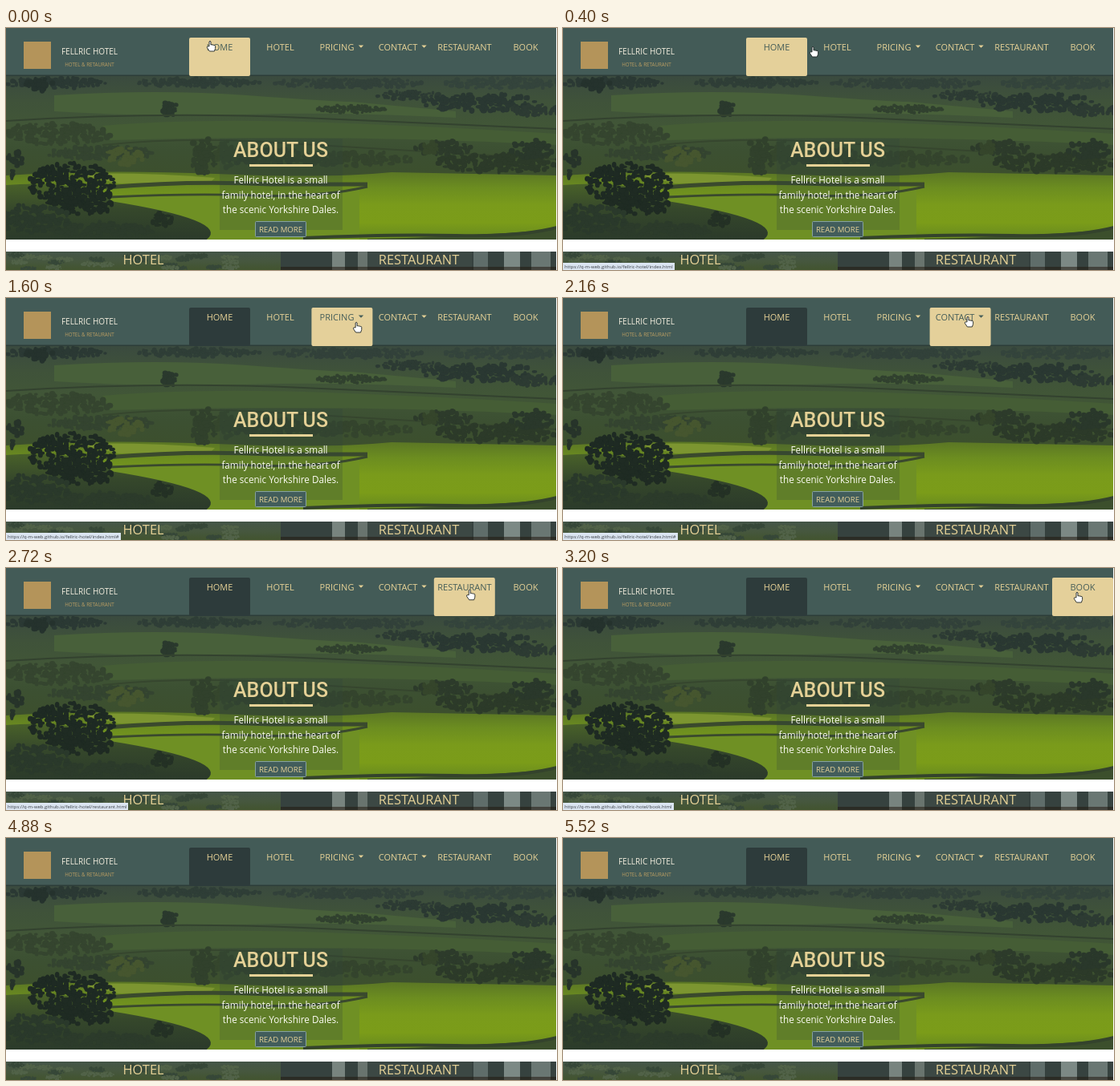
Animation, 686 px wide and 302 px high, one loop 5600 ms. Source, as an HTML page with a canvas:

```html
<!DOCTYPE html>
<html lang="en">
<head>
<meta charset="utf-8">
<title>Fellric Hotel</title>
<style>
html, body { margin: 0; width: 100%; height: 100%; overflow: hidden; background: #fff; }
canvas, svg { position: absolute; left: 0; top: 0; display: block; }
text { font-family: "Open Sans", "Noto Sans", sans-serif; text-anchor: middle; fill: #e5d196; }
.nav text { font-size: 11px; }
.tab { fill: none; }
.tab.current { fill: #2d3b3b; }
.on .tab { fill: #e4d09a; }
.nav .on text, .on .caret { fill: #465e59; }
.caret { fill: #e5d196; }
.title { font: 500 25px Roboto, sans-serif; }
.copy text { font-size: 11.7px; fill: #fbfbf3; }
.panel { font-size: 16.4px; font-weight: 500; }
#status {
  position: absolute; left: 0; top: 293px; height: 9px; padding: 0 2px;
  background: #dbe5f1; color: #3b4048; white-space: nowrap;
  font: 5.9px/10px "Open Sans", "Noto Sans", sans-serif;
}
</style>
</head>
<body>
<canvas id="photo" width="686" height="302"></canvas>
<svg width="686" height="302" viewBox="0 0 686 302">
  <rect width="686" height="59" fill="#435b57"/>
  <rect y="58.5" width="686" height="1.5" fill="#2d3d39"/>

  <rect x="22" y="17" width="34" height="34" fill="#b4945a"/>
  <text x="104" y="33" font-size="10" style="fill:#f1ecdc">FELLRIC HOTEL</text>
  <text x="104" y="47.5" font-size="6.2" style="fill:#b89c62">HOTEL &amp; RETAURANT</text>

  <g class="nav" id="nav"></g>

  <rect x="266" y="138" width="153" height="114" fill="#2f443a" opacity=".24"/>
  <text class="title" x="342" y="161">ABOUT US</text>
  <rect x="303" y="170" width="79" height="3" fill="#e5d196"/>
  <g class="copy">
    <text x="342" y="194">Fellric Hotel is a small</text>
    <text x="342" y="212.5">family hotel, in the heart of</text>
    <text x="342" y="231">the scenic Yorkshire Dales.</text>
  </g>
  <rect x="310.5" y="241.5" width="63" height="19" rx="1" fill="#425d5b" stroke="#86a3a0"/>
  <text x="342" y="255" font-size="9.6">READ MORE</text>

  <text class="panel" x="171" y="295">HOTEL</text>
  <text class="panel" x="514" y="295">RESTAURANT</text>
  <rect x="685" width="1" height="302" fill="#fff"/>

  <path id="hand" fill="#fff" stroke="#1d2424" stroke-width=".9" stroke-linejoin="round"
    d="M-1 7V1Q0-.6 1 1V5Q2 4 3 5.2Q4 4.4 5 5.6Q6.4 5 6.6 6.6V9.5L5.4 13H-.6L-3.6 8.6Q-4 6.6-2.4 6.8Z"/>
</svg>
<div id="status"></div>

<script>
const $ = id => document.getElementById(id);

// Background pictures
const ctx = $("photo").getContext("2d");
let seed = 7;
const rnd = () => (seed = seed * 16807 % 2147483647) / 2147483647;

function ramp(y0, y1, ...colors) {
  const g = ctx.createLinearGradient(0, y0, 0, y1);
  colors.forEach((c, i) => g.addColorStop(i / (colors.length - 1), c));
  return g;
}
function box(x, y, w, h, fill) {
  ctx.fillStyle = fill;
  ctx.fillRect(x, y, w, h);
}
function field(fill, d) {
  ctx.fillStyle = fill;
  ctx.fill(new Path2D(d));
}
function wall(color, width, d) {
  ctx.strokeStyle = color;
  ctx.lineWidth = width;
  ctx.stroke(new Path2D(d));
}
// Leafy clump: many small blobs inside an ellipse, denser in the middle
function trees(x, y, w, h, color) {
  ctx.fillStyle = color;
  const r = Math.min(4, h / 6);
  const n = w * h / (r * r) * .55;
  for (let i = 0; i < n; i++) {
    const a = rnd() * 2 * Math.PI, k = rnd() ** .6;
    ctx.beginPath();
    ctx.ellipse(x + Math.cos(a) * k * (w / 2 - r), y + Math.sin(a) * k * (h / 2 - r),
      r * (.5 + rnd() * .6), r * (.4 + rnd() * .6), 0, 0, 7);
    ctx.fill();
  }
}

function paintValley() {
  ctx.save();
  ctx.beginPath();
  ctx.rect(0, 59, 686, 205);
  ctx.clip();
  box(0, 59, 686, 205, ramp(59, 184, "#3a4a3f", "#3f523a", "#415637", "#3c5032", "#3c4f2d"));
  field("#48603a", "M60 84Q190 76 300 84T430 92L560 104V112Q400 104 300 108T60 104Z");
  field("#455d35", "M120 122Q240 112 400 118T686 132V146Q420 132 130 140Z");
  trees(60, 69, 140, 20, "#2b3934");
  trees(240, 68, 160, 17, "#2f3e37");
  trees(430, 69, 200, 18, "#32413a");
  trees(620, 69, 160, 20, "#34443c");
  trees(500, 84, 90, 16, "#2d3b34");
  trees(590, 93, 150, 30, "#2a3832");
  trees(660, 102, 70, 22, "#2d3b33");
  trees(430, 101, 90, 15, "#31412f");
  trees(43, 71, 44, 24, "#25322d");
  trees(203, 101, 28, 28, "#2a392d");
  trees(60, 132, 150, 34, "#35452f");
  wall("#33422f", 2, "M0 116Q190 104 370 112T686 126");
  wall("#36462e", 2, "M120 146Q220 136 320 142T686 164");

  field(ramp(178, 264, "#597425", "#6c8d20", "#7a9b1b", "#7b9c19", "#668820"),
    "M0 184Q120 176 260 182T480 180L686 184V264H0Z");
  field(ramp(190, 264, "#4c6529", "#35472b", "#2b3a2a"),
    "M0 196Q70 190 130 208T290 228L250 264H0Z");
  field("#6f9024", "M130 208Q220 206 330 211L440 200V264H250Q280 240 130 216Z");
  field("#7c9530", "M90 182Q170 180 260 187L255 192L140 194Z");
  field("#3c4f2c", "M450 263Q570 261 686 251V264H450Z");
  wall("#3a492d", 5, "M125 199Q230 190 330 195L450 195");
  wall("#3a492d", 3, "M130 211Q230 206 310 209T450 198");
  wall("#34432c", 4, "M370 262Q480 257 560 259T686 249");

  trees(120, 156, 150, 24, "#344430");
  trees(320, 160, 130, 28, "#33432e");
  trees(430, 163, 160, 26, "#34442d");
  trees(545, 150, 80, 26, "#2d3b2b");
  trees(615, 168, 170, 32, "#2c3a29");
  trees(528, 149, 26, 24, "#35452b");
  trees(655, 151, 60, 32, "#2a382b");
  trees(245, 159, 40, 54, "#31412c");
  trees(274, 157, 32, 42, "#35462d");
  trees(148, 160, 56, 30, "#46562f");
  trees(12, 163, 26, 28, "#27342a");
  trees(8, 182, 10, 18, "#27342a");

  trees(82, 194, 116, 60, "#1e2a23");
  trees(95, 216, 96, 42, "#1f2b23");
  trees(30, 238, 110, 44, "#2a392b");
  trees(120, 252, 140, 26, "#2c3b2b");
  trees(193, 240, 36, 28, "#243125");
  ctx.restore();
}

function paintPanels() {
  box(0, 264, 686, 15, "#fff");
  box(0, 279, 342, 23, ramp(279, 302, "#445548", "#46573f", "#42542f"));
  for (let i = 0; i < 24; i++)
    trees(rnd() * 330, 283 + rnd() * 18, 24, 9, i % 2 ? "#526349" : "#374839");
  box(342, 279, 344, 23, "#36423f");
  box(406, 279, 16, 23, "#78847f");
  box(438, 279, 12, 23, "#69746e");
  box(450, 279, 130, 23, "#3c4844");
  box(582, 279, 18, 23, "#5f6d6a");
  box(620, 279, 20, 23, "#7c8985");
  box(654, 279, 24, 23, "#6a7773");
  box(342, 298, 344, 4, "rgba(36,26,18,.55)");
}
paintValley();
paintPanels();

// Navigation
const TAB_W = 76.2, NAV_X = 228;
const links = [
  ["HOME", 266, "index.html"],
  ["HOTEL", 341.5, "hotel.html"],
  ["PRICING", 412, "index.html#", 442],
  ["CONTACT", 488, "index.html#", 520.5],
  ["RESTAURANT", 571, "restaurant.html"],
  ["BOOK", 647, "book.html"]
];
$("nav").innerHTML = links.map(([label, x, , caret], i) => `<g>
  <rect class="tab${i ? "" : " current"}" x="${NAV_X + i * TAB_W}" y="12" width="76" height="48" rx="2"/>
  <text x="${x}" y="27.5">${label}</text>
  ${caret ? `<path class="caret" d="M${caret - 3.2} 21.5h6.4l-3.2 3.3z"/>` : ""}</g>`).join("");
const tabs = [...$("nav").children];

// Pointer path: time, x, y
const path = [[0, 254, 16], [400, 311, 23], [1120, 378, 36], [2160, 504, 23], [3200, 640, 30], [3600, 692, 27]];
const LOOP = 5600, TICK = 80, LEAVE = 3600;

function pointerAt(t) {
  const i = Math.max(1, path.findIndex(p => p[0] > t));
  const [t0, x0, y0] = path[i - 1], [t1, x1, y1] = path[i];
  const k = (t - t0) / (t1 - t0);
  return [x0 + (x1 - x0) * k, y0 + (y1 - y0) * k];
}

function draw(now) {
  // Every fifth tick repeats the previous picture
  let t = Math.floor(now % LOOP / TICK) * TICK;
  if (t % 400 === 240) t -= TICK;

  const inside = t < LEAVE;
  const [x, y] = pointerAt(Math.min(t, LEAVE - 1));
  const hover = Math.min(5, Math.floor((x - NAV_X - 9) / TAB_W));

  tabs.forEach((tab, i) => tab.classList.toggle("on", inside && i === hover));
  $("hand").setAttribute("transform", `translate(${x} ${y})`);
  $("hand").style.display = inside ? "" : "none";
  $("status").style.display = t >= 320 && t < 3920 ? "" : "none";
  $("status").textContent = "https://q-m-web.github.io/fellric-hotel/" + links[hover][2];
}

const start = performance.now();
function loop() {
  draw(performance.now() - start);
  requestAnimationFrame(loop);
}
loop();
</script>
</body>
</html>
```
